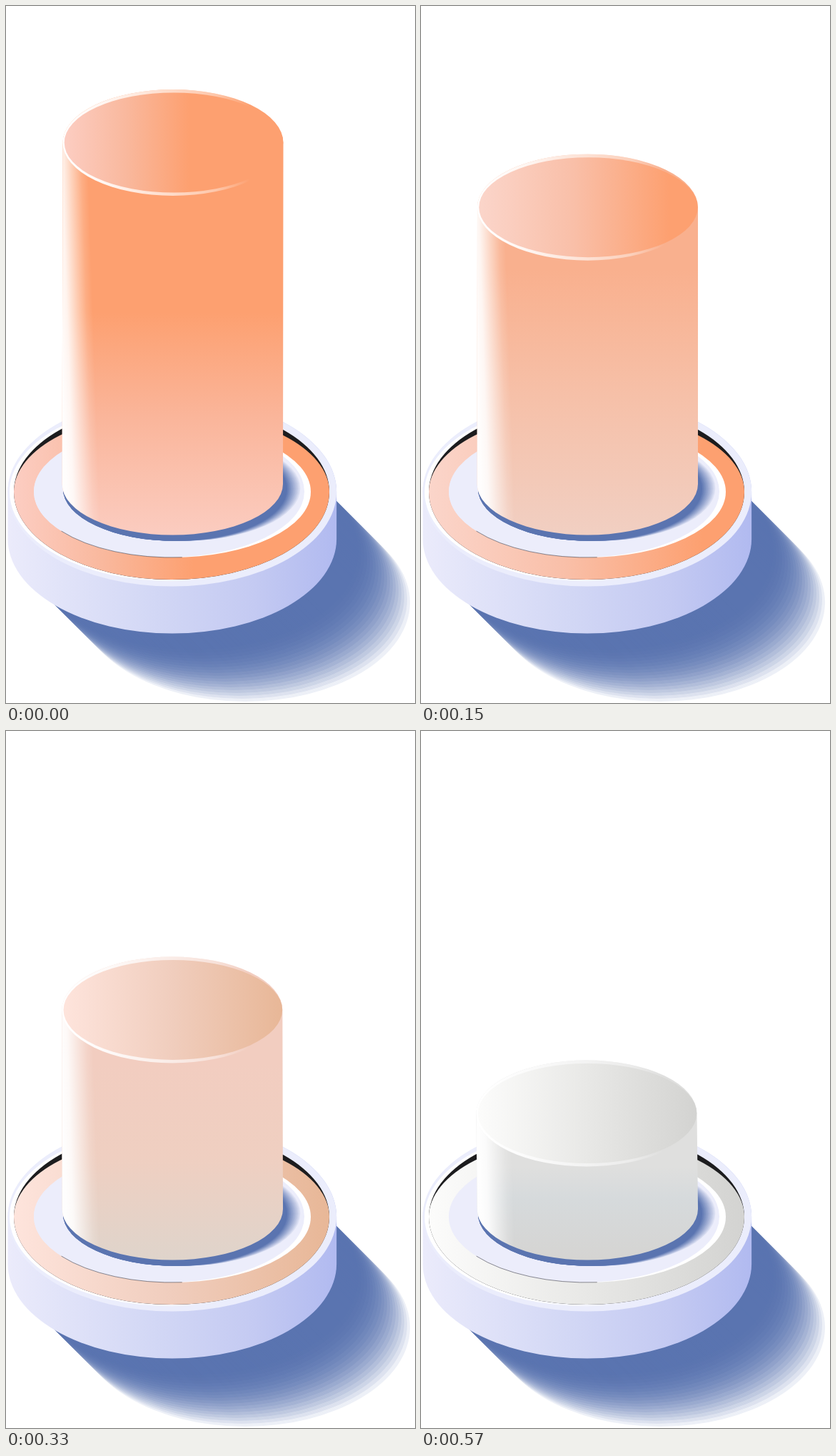
Write an HTML page with a canvas that moves like this. It is 573 px wide and 977 px high and loops after 0.6 s.

```html
<!DOCTYPE html>
<html>
<head>
<meta charset="utf-8">
<style>
html, body { margin: 0; width: 100%; height: 100%; overflow: hidden; background: #fff; }
canvas { display: block; }
</style>
</head>
<body>
<canvas id="stage" width="573" height="977"></canvas>
<script>
const ctx = document.getElementById('stage').getContext('2d');
const LOOP = 600, STEP = 30;

// time, top face: three colours and extent, wall: three colours and three heights
const KEYS = [
  [0,   ['fccdc2', 'f9b89d', 'fda070'], 0.57, ['fda070', 'fab59a', 'fbccc0'], [430, 575]],
  [60,  ['fbcbc0', 'f9b699', 'fda070'], 0.69, ['fda070', 'f9b89c', 'f4ccc2'], [345, 540]],
  [150, ['fbd5ca', 'f9bfa8', 'fda070'], 0.87, ['f9b08e', 'f6c0a8', 'f1cfc2'], [370, 545]],
  [210, ['fbdacf', 'f4c4ae', 'f9a175'], 1,    ['fbbda3', 'f4c4b2', 'efd1c3'], [390, 565]],
  [330, ['fee4dc', 'f0cdbd', 'e8b797'], 1,    ['f2cdc0', 'efcfc1', 'dfd4cb'], [465, 600]],
  [450, ['fdf1ed', 'eedbd3', 'dbc5b5'], 1,    ['ecdcd5', 'e1d4d1', 'dfd0c8'], [537, 600]],
  [570, ['fcfcfb', 'e8e8e6', 'd3d3d1'], 1,    ['dfdfde', 'd6dadc', 'd5d4d2'], [610, 655]]
];

const lerp = (a, b, k) => a + (b - a) * k;
const channels = hex => [0, 2, 4].map(i => parseInt(hex.substr(i, 2), 16));

function mix(a, b, k) {
  if (Array.isArray(a)) return a.map((v, i) => mix(v, b[i], k));
  if (typeof a === 'number') return lerp(a, b, k);
  const to = channels(b);
  return 'rgb(' + channels(a).map((v, i) => Math.round(lerp(v, to[i], k))) + ')';
}

function stateAt(t) {
  let i = 0;
  while (i < KEYS.length - 2 && KEYS[i + 1][0] <= t) i++;
  const a = KEYS[i], b = KEYS[i + 1];
  return mix(a, b, (t - a[0]) / (b[0] - a[0]));
}

function gradient(x0, y0, x1, y1, stops) {
  const g = ctx.createLinearGradient(x0, y0, x1, y1);
  stops.forEach(([at, colour]) => g.addColorStop(at, colour));
  return g;
}

const white = a => `rgba(255,255,255,${a})`;
const across = (x0, x1, stops) => gradient(x0, 0, x1, 0, stops);

function oval(x, y, rx, ry, fill) {
  ctx.beginPath();
  ctx.ellipse(x, y, rx, ry, 0, 0, 2 * Math.PI);
  ctx.fillStyle = fill;
  ctx.fill();
}

// Upper half of one ellipse joined to the lower half of another
function drum(top, bottom, fill) {
  ctx.beginPath();
  ctx.ellipse(...top, 0, Math.PI, 2 * Math.PI);
  ctx.ellipse(...bottom, 0, 0, Math.PI);
  ctx.closePath();
  ctx.fillStyle = fill;
  ctx.fill();
}

function groundShadow() {
  for (let d = 100; d >= 0; d--) {
    const band = Math.floor(d / 4) * 4;
    const k = 1 - Math.pow(Math.max(0, band - 20) / 80, 2.2);
    oval(236 + d, 737 + d, 231, 139, mix('ffffff', '5a74b0', k));
  }
}

function faceGradient(x0, x1, colours, extent) {
  return across(x0, x1, colours.map((c, i) => [extent * i / 2, c]));
}

function base(colours, extent) {
  const lip = [232.8, 681, 230.3, 132.5];
  drum(lip, [232.8, 747, 230.3, 132.5], across(2, 463, [
    [0, '#ebebfb'], [0.15, '#e2e4f9'], [0.45, '#d2d7f5'], [0.75, '#c4caf2'], [1, '#b1baf0']
  ]));
  oval(...lip, '#ebedfc');
  oval(232, 681, 227, 125.5, across(5, 300, [[0, '#fff'], [0.4, '#fff'], [1, white(0)]]));

  // Groove, coloured ring and plateau
  oval(232, 681, 221, 123, '#1c1c1e');
  drum([232, 681, 221, 112], [232, 681, 221, 123], faceGradient(11, 453, colours, extent));
  oval(233, 681, 194, 92, across(39, 427, [[0, '#ecedfb'], [0.45, '#ecedfb'], [0.6, '#fff'], [1, '#fff']]));
  oval(228.5, 680.5, 189.5, 92, '#ecedfb');
  ctx.beginPath();
  ctx.ellipse(233, 681, 194, 92, 0, 1.5, 2.5);
  ctx.strokeStyle = 'rgba(40,40,48,.75)';
  ctx.lineWidth = 0.7;
  ctx.stroke();

  for (let i = 0; i <= 12; i++) {
    const k = i / 12;
    oval(lerp(247, 237, k), lerp(676, 677, k), lerp(167, 157, k), lerp(74, 73, k),
      mix('ecedfb', '5a74b0', Math.pow(k, 0.9)));
  }
}

function column(t, colours, extent, wall, levels) {
  const x = 234 - 2 * t / 570, y = 191.5 + 344.5 * t / 570;
  const rim = [x, y, 154.5, 74.5], foot = [233.3, 670, 154.7, 71.5];
  const heights = [...levels, 741], start = heights[0];
  drum(rim, foot, gradient(0, start, 0, 741,
    wall.map((c, i) => [(heights[i] - start) / (741 - start), c])));
  drum(rim, foot, gradient(79, 500, 124, 498.5, [
    [0, white(0.97)], [0.2, white(0.88)], [0.5, white(0.5)], [0.8, white(0.14)], [1, white(0)]
  ]));
  oval(...rim, across(x - 154, x + 154, [
    [0, '#fff'], [0.2, white(0.9)], [0.5, white(0.62)], [0.7, white(0.4)], [0.85, white(0)]
  ]));
  oval(x + 1, y, 153.3, 70, faceGradient(x - 152, x + 154, colours, extent));
}

function draw(now) {
  const t = Math.floor(now % LOOP / STEP) * STEP;
  const [, face, extent, wall, levels] = stateAt(t);
  ctx.fillStyle = '#fff';
  ctx.fillRect(0, 0, 573, 977);
  groundShadow();
  base(face, extent);
  column(t, face, extent, wall, levels);
}

let begin;
function tick(now) {
  begin ??= now;
  draw(now - begin);
  requestAnimationFrame(tick);
}
requestAnimationFrame(tick);
</script>
</body>
</html>
```
